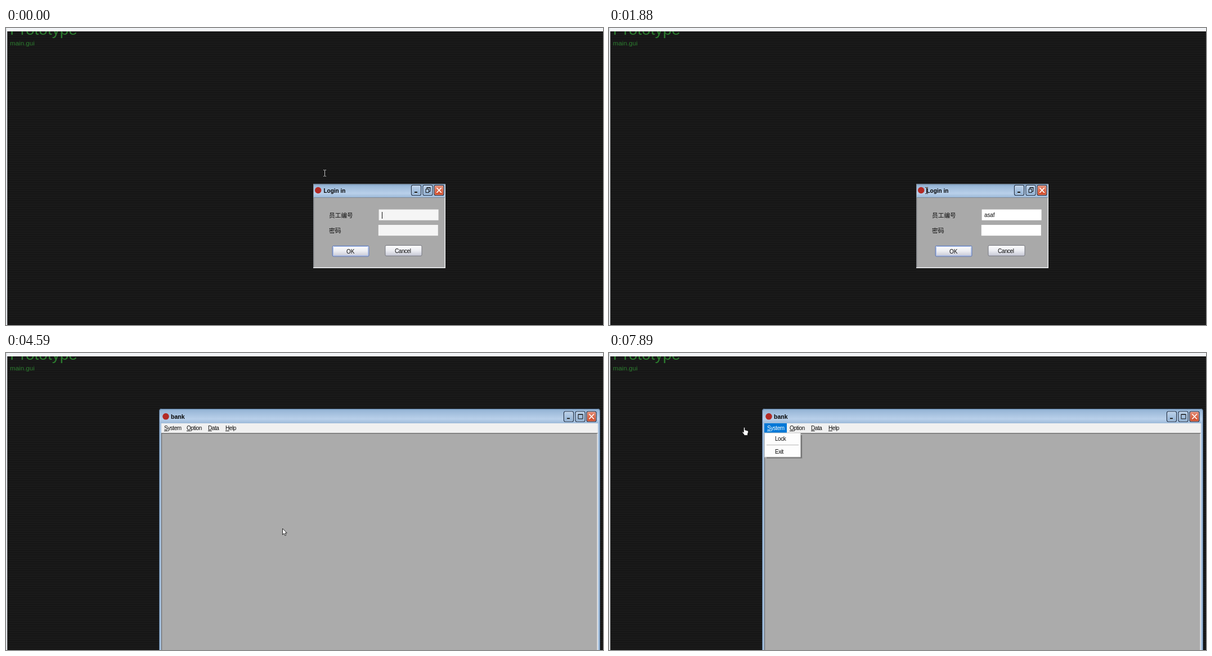
These frames come from a looping animation (1061x528 px, 8000 ms). An HTML page:

```html
<!DOCTYPE html>
<html lang="en">
<head>
<meta charset="utf-8">
<title>Login demo</title>
<style>
html, body { margin: 0; width: 100%; height: 100%; overflow: hidden; background: #171717; }
svg { display: block; width: 1061px; height: 528px; }
text { font: 10px "Liberation Sans", sans-serif; letter-spacing: -.45px; fill: #0a0a0a; white-space: pre; }
.bold { font-weight: bold; letter-spacing: 0; fill: #050505; }
.typed { letter-spacing: -.1px; }
.cjk { font: 10.7px "Noto Sans CJK SC", "Noto Sans CJK", sans-serif; letter-spacing: 0; }
.green { fill: #2c7c2f; letter-spacing: 0; }
.key { text-decoration: underline; }
#beam { fill: none; stroke: #ddd; mix-blend-mode: difference; }
#arrow, #hand { fill: #fff; stroke: #111; stroke-width: .9; stroke-linejoin: round; }
</style>
</head>
<body>
<svg viewBox="0 0 1061 528">
  <defs>
    <pattern id="lines" width="16" height="16" patternUnits="userSpaceOnUse">
      <rect width="16" height="16" fill="#121212"/>
      <path d="M0 .8H16M0 4H16M0 7.2H16M0 10.4H16M0 13.6H16" stroke="#1e1e1e" stroke-width="1.6"/>
    </pattern>
    <linearGradient id="bar" x2="0" y2="1">
      <stop offset="0" stop-color="#87a9cc"/>
      <stop offset=".15" stop-color="#9ab8d8"/>
      <stop offset=".7" stop-color="#b9d0ea"/>
      <stop offset="1" stop-color="#9dbad9"/>
    </linearGradient>
    <linearGradient id="blue" x2="0" y2="1">
      <stop offset="0" stop-color="#bdd2ea"/>
      <stop offset="1" stop-color="#8fb0d3"/>
    </linearGradient>
    <linearGradient id="red" x2="0" y2="1">
      <stop offset="0" stop-color="#e58f79"/>
      <stop offset="1" stop-color="#cf4420"/>
    </linearGradient>
    <linearGradient id="push" x2="0" y2="1">
      <stop offset="0" stop-color="#fdfdfe"/>
      <stop offset=".5" stop-color="#ecedf2"/>
      <stop offset="1" stop-color="#c5c7d4"/>
    </linearGradient>
    <g id="frame">
      <rect x=".5" y=".5" width="17" height="18" rx="2.5" stroke="#1a2a42" stroke-width="1.2"/>
      <rect x="1.5" y="1.5" width="15" height="16" rx="1.5" fill="none" stroke="#fff" stroke-opacity=".35"/>
    </g>
    <g id="min">
      <use href="#frame" fill="url(#blue)"/>
      <path d="M6 13H11" stroke="#111" stroke-width="2"/>
      <path d="M6 14.5H11" stroke="#fff" stroke-opacity=".6"/>
    </g>
    <g id="max"><use href="#frame" fill="url(#blue)"/><path d="M5.5 5.5H13.5V13.5H5.5ZM5 6H14" fill="none" stroke="#111"/></g>
    <g id="restore"><use href="#frame" fill="url(#blue)"/><path d="M7.5 7V4.5H13.5V11.5H11.5M5.5 7.5H11V13.5H5.5ZM7 5H14" fill="none" stroke="#111"/></g>
    <g id="close"><use href="#frame" fill="url(#red)"/><path d="M4.8 5L13.4 14M13.4 5L4.8 14" stroke="#fff" stroke-width="1.7"/></g>
  </defs>

  <rect width="1061" height="528" fill="url(#lines)"/>
  <text class="green" x="7" y="12" style="font-size:28px">Prototype</text>
  <text class="green" x="7" y="30.5" style="font-size:11.6px">main.gui</text>
  <rect width="1061" height="6" fill="#f3f5f8"/>
  <rect width="2" height="528" fill="#e3e6ea"/>
  <rect x="2" y="6" width="1" height="522" fill="#555"/>

  <g id="login">
    <rect x="546" y="277.5" width="235" height="149.5" fill="#f1f3f5"/>
    <rect x="546" y="277.5" width="2" height="148" fill="#85888c"/>
    <rect x="547.6" y="301" width="232" height="124.5" fill="#a9a9a9"/>
    <rect x="546.8" y="277.5" width="233.4" height="23.5" fill="url(#bar)"/>
    <path d="M547 278H780" stroke="#6f8296"/>
    <path d="M547 301.5H780" stroke="#7e8791"/>
    <circle cx="554.7" cy="288.5" r="5.7" fill="#b32a25"/>
    <text class="bold" x="564.5" y="292.5">Login in</text>
    <use href="#min" x="720" y="279"/>
    <use href="#restore" x="740.5" y="279"/>
    <use href="#close" x="760.5" y="279"/>
    <text class="cjk" x="574" y="337">员工编号</text>
    <text class="cjk" x="574" y="364">密码</text>
    <g id="fields">
      <rect x="662.6" y="322.6" width="106" height="19.2"/>
      <rect x="661.8" y="350" width="106" height="19.2"/>
    </g>
    <text class="typed" id="user" x="667" y="336"></text>
    <text class="typed" id="pass" x="667" y="363.3"></text>
    <rect x="580.2" y="387.3" width="64.8" height="18.7" rx="2" fill="url(#push)" stroke="#5673b5"/>
    <rect x="581.5" y="388.5" width="62" height="16.2" rx="1" fill="none" stroke="#a9bdea"/>
    <text x="605" y="400.5" style="letter-spacing:0">OK</text>
    <rect x="674" y="386.5" width="65" height="18.7" rx="2" fill="url(#push)" stroke="#74767e"/>
    <text x="691" y="399.7">Cancel</text>
    <rect id="caret" width="1" height="12" fill="#111"/>
    <rect id="popup" y="341.2" width="500" height="38" fill="#fff" stroke="#4a94c4"/>
  </g>

  <g id="main">
    <path d="M272.5 528V103Q272.5 99 276.5 99H1051.5Q1055.5 99 1055.5 103V528Z" fill="#a6c1df"/>
    <path d="M272.5 125V103Q272.5 99 276.5 99H1051.5Q1055.5 99 1055.5 103V125Z" fill="url(#bar)"/>
    <path d="M272.5 528V103Q272.5 99.5 276.5 99.5H1051.5Q1055.5 99.5 1055.5 103V528" fill="none" stroke="#4f6b8b"/>
    <circle cx="284" cy="112.8" r="5.8" fill="#b32a25"/>
    <text class="bold" x="293" y="116.8" style="font-size:10.6px">bank</text>
    <use href="#min" x="991" y="103.5"/>
    <use href="#max" x="1011.5" y="103.5"/>
    <use href="#close" x="1031.5" y="103.5"/>
    <rect x="276" y="125" width="776" height="17" fill="#f0f0f0"/>
    <rect x="276" y="142" width="776" height="386" fill="#ababab"/>
    <path d="M276.5 528V142.8H1051" fill="none" stroke="#747474" stroke-width="1.4"/>
    <path d="M1051.2 143V528" stroke="#f2f2f2" stroke-width="1.4"/>
    <rect id="hot" x="276" y="125" width="40" height="17" fill="#0078d7"/>
    <text id="system" x="281" y="137"><tspan class="key">S</tspan>ystem</text>
    <text x="321" y="137"><tspan class="key">O</tspan>ption</text>
    <text x="359" y="137"><tspan class="key">D</tspan>ata</text>
    <text x="390" y="137"><tspan class="key">H</tspan>elp</text>
    <g id="menu">
      <rect x="280" y="146" width="63.5" height="41.5" fill="#000" opacity=".2"/>
      <rect x="280" y="146" width="62" height="40.5" fill="#000" opacity=".3"/>
      <rect x="276.5" y="142" width="64" height="43" fill="#fdfdfd" stroke="#c4c4c4"/>
      <path d="M280 163.5H337" stroke="#b5b5b5"/>
      <text x="295" y="155.5">Lock</text>
      <text x="295" y="179">Exit</text>
    </g>
  </g>

  <path id="beam" d="M-2.5 -5.5H-.8L0 -5L.8 -5.5H2.5M0 -5V5M-2.5 5.5H-.8L0 5L.8 5.5H2.5"/>
  <path id="arrow" d="M0 0V11L2.6 8.7L4.4 12.6L6.2 11.8L4.5 8H7.8Z"/>
  <path id="hand" d="M-1.2 1Q0 -.6 1.2 1V4.8L6 6.2Q7.3 6.7 7 8.5L6 12V14.5H-.5V13L-3.6 9.2Q-4 7.4 -2.5 7.8L-1.2 9Z"/>
</svg>

<script>
const LOOP = 8000;
const $ = id => document.getElementById(id);
const show = (id, on) => { $(id).style.display = on ? "" : "none"; };

// pointer: [ms, shape, x, y]
const pointer = [
  [0, "beam", 566.5, 258], [120, "beam", 566.5, 263], [250, "arrow", 565, 275],
  [380, "beam", 564.5, 286], [520, "arrow", 564, 283], [1330, "beam", 564.5, 289],
  [2120, "beam", 564.5, 288], [2700, "beam", 564.5, 287],
  [3770, "beam", 562.5, 289], [3910, "arrow", 545, 296], [4050, "arrow", 518, 307],
  [4190, "hand", 495, 312], [4320, "hand", 491.5, 311.5],
  [4590, "arrow", 491.5, 312], [5020, "arrow", 478, 300], [5150, "arrow", 432, 262],
  [5280, "arrow", 368, 208], [5410, "arrow", 304, 156], [5540, "arrow", 260, 122],
  [5670, "arrow", 241, 110], [5800, "arrow", 236, 106],
  [6350, "arrow", 236, 110], [6500, "hand", 238.5, 117], [6780, "hand", 239, 117],
  [7210, "hand", 238.5, 118], [7620, "hand", 244, 115], [7750, "hand", 246, 123],
  [7890, "hand", 240.5, 132]
];
// typing: [ms, user, password]
const typing = [
  [0, "", ""], [380, "a", ""], [520, "as", ""], [650, "asa", ""], [780, "asaf", ""],
  [3360, "asaf", "s"], [3500, "asaf", "sd"], [3630, "asaf", "sdf"]
];
// caret: [ms, field or none]
const caret = [
  [0, "user"], [1060, ""], [1180, "user"], [1760, ""], [2290, "user"], [2700, ""],
  [2970, "pass"], [3910, ""]
];

const at = (rows, t) => rows.findLast(row => row[0] <= t);

// caret position after the text of a field
const end = id => 668 + Math.round($(id).textContent ? $(id).getComputedTextLength() - .5 : 0);

function drawLogin(t) {
  const [, user, pass] = at(typing, t);
  const field = at(caret, t)[1];
  const popup = t >= 380 && t < 1330;
  $("user").textContent = user;
  $("pass").textContent = pass;
  $("user").setAttribute("x", popup ? 668 : 667);
  $("fields").setAttribute("fill", t < 120 ? "#f5f5f5" : "#fff");
  show("caret", field);
  $("caret").setAttribute("x", end(field || "user"));
  $("caret").setAttribute("y", field === "pass" ? 354 : 327);
  show("popup", popup);
  $("popup").setAttribute("x", end("user") - 2.3);
}

function draw(t) {
  const login = t < 4590, open = t >= 6080;
  show("login", login);
  show("main", !login);
  show("hot", open);
  show("menu", open);
  $("system").style.fill = open ? "#fff" : "";
  if (login) drawLogin(t);

  const [, shape, x, y] = at(pointer, t);
  for (const id of ["beam", "arrow", "hand"]) show(id, id === shape);
  $(shape).setAttribute("transform", `translate(${x} ${y})`);
}

const start = performance.now();
function tick() {
  draw((performance.now() - start) % LOOP);
  requestAnimationFrame(tick);
}
draw(0);
requestAnimationFrame(tick);
</script>
</body>
</html>
```
